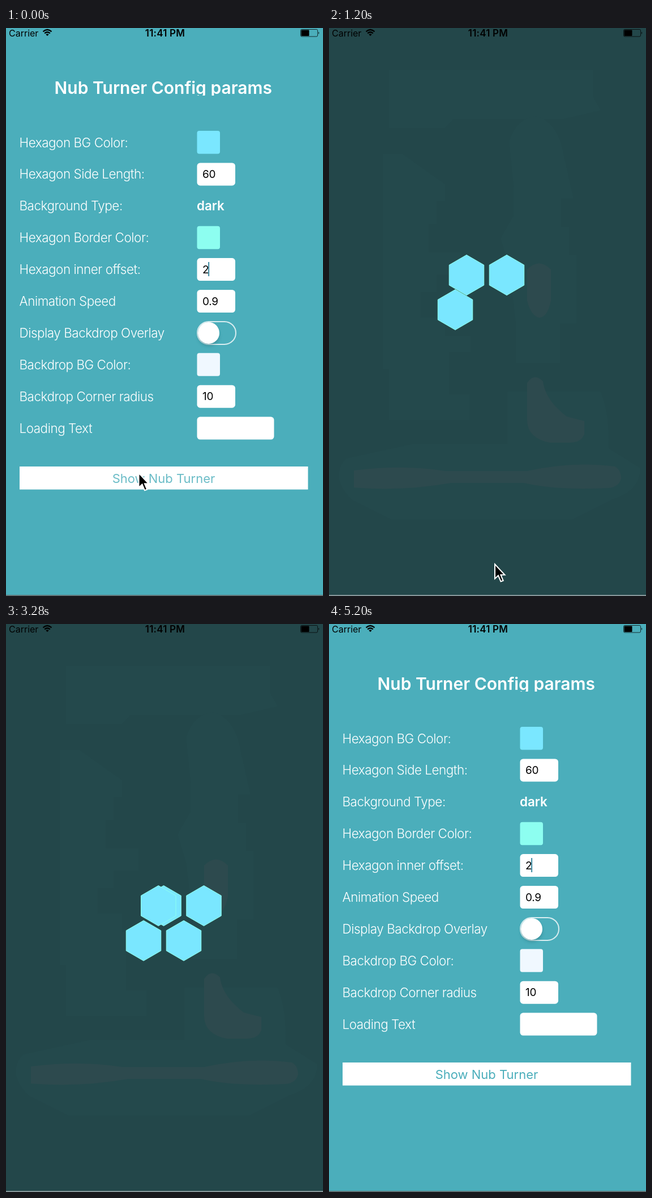
An HTML page that plays this animation: 560 px wide and 1000 px high, repeating every 5.28 s.

```html
<!DOCTYPE html>
<html lang="en">
<head>
<meta charset="utf-8">
<title>Hexagon spinner settings</title>
<style>
  html, body { margin: 0; width: 100%; height: 100%; overflow: hidden; background: #4baebb; }
  svg { display: block; width: 560px; height: 1000px; }
  text { font-family: Inter, Roboto, sans-serif; }
  .title { font-size: 30px; font-weight: 600; fill: #fff; }
  .label { font-size: 22.5px; font-weight: 300; letter-spacing: -.5px; fill: #fff; }
  .value { font-size: 22.4px; font-weight: 600; fill: #fff; }
  .entry { font-size: 19px; letter-spacing: -.3px; fill: #000; }
  .action { font-size: 22px; fill: #4baebb; }
  .status { font-size: 16px; fill: #000; }
  .time { font-size: 17px; font-weight: 600; letter-spacing: .2px; }
  .hex { fill: #7ae7ff; stroke: #8dfef0; stroke-width: 1; }
</style>
</head>
<body>
<svg viewBox="0 0 560 1000">
  <defs>
    <clipPath id="cut"><rect y="80" width="560" height="39"/></clipPath>
    <filter id="soft" x="-30%" y="-30%" width="160%" height="160%"><feGaussianBlur stdDeviation="3"/></filter>
  </defs>

  <rect width="560" height="1000" fill="#4baebb"/>
  <text class="title" x="470" y="115.5" text-anchor="end" clip-path="url(#cut)">Nub Turner Config params</text>
  <g id="form"></g>
  <rect x="24" y="772" width="509.5" height="40.5" fill="#fff"/>
  <text id="action" class="action" x="278.5" y="801" text-anchor="middle">Show Nub Turner</text>
  <rect y="998" width="560" height="2" fill="#5f7377"/>

  <g id="overlay">
    <rect width="560" height="1000" fill="#23474a"/>
    <g fill="#24494c">
      <path d="M106 74H466V120L480 145L415 160H220L205 176H106Z"/>
      <path d="M95 222H130L205 275V305H190V345H176V395H234V434H190V465H162V510H205V542H250V570H212V645H248V690H106V600H95Z"/>
      <path d="M318 200Q330 160 365 155Q405 165 415 225L432 300H410V350H424V400H437V520H408V590H330V520L318 420L303 370L326 330V280Z"/>
      <path d="M315 640H480Q496 680 494 740L550 775Q550 815 500 830L430 865H110L40 830Q0 790 30 758L150 732H315Z"/>
    </g>
    <g fill="#2d4a4e">
      <path d="M350 425Q371 404 392 425V480Q386 510 371 510Q356 506 350 480Z"/>
      <path d="M350 625Q362 606 378 622Q382 655 420 684L451 692V715Q446 730 425 730H390Q350 722 350 690Z"/>
      <path d="M44 779Q130 768 205 780H350Q430 762 505 772Q516 778 516 793Q512 810 490 810Q400 814 345 801H215Q130 816 44 809Z"/>
    </g>
    <rect y="998" width="560" height="2" fill="#87979a"/>
    <g id="cells"></g>
  </g>

  <text class="status" x="5" y="14.5">Carrier</text>
  <g fill="none" stroke="#000" stroke-width="2.2">
    <path d="M65.5 6.3Q73 -.3 80.5 6.3"/>
    <path d="M68.2 9.3Q73 5.2 77.8 9.3"/>
  </g>
  <path d="M70.3 11.3Q73 9.2 75.7 11.3L73 14Z"/>
  <text class="status time" x="281" y="15" text-anchor="middle">11:41 PM</text>
  <rect x="520.5" y="2.5" width="30" height="12.5" rx="2" fill="none" stroke="#000" stroke-opacity=".75"/>
  <rect x="521.5" y="3.5" width="14" height="10.5" rx="1"/>
  <path d="M552 6.5Q554 8.7 552 11Z"/>

  <path id="cursor" d="M0 0V25.5L6 20L10.5 30.5L14.7 29L10.4 18.7H17.5Z" fill="#000" stroke="#fff" stroke-width="2"/>
</svg>

<script>
const LOOP = 5280, FRAME = 80;
const GROW = 155, MOVE = 200, SHRINK = 147;
const OUT = 388, OUT_STEP = 337;
const BACK = 2433, BACK_STEP = 347;
const CENTER = [278.5, 496];
// Offsets in the order the cells leave the center; the last one stays there.
const CELLS = [[-35.5, -61], [35.5, -61], [-71, 0], [71, 0], [-35.5, 61.5], [35.5, 61.5], [0, 0]];
const CYCLE_END = BACK + 6 * BACK_STEP + MOVE + SHRINK;
const CYCLE = CYCLE_END - (OUT - GROW);

const $ = id => document.getElementById(id);
const ramp = (t, start, span) => Math.min(1, Math.max(0, (t - start) / span));
const ease = p => (1 - Math.cos(Math.PI * p)) / 2;

function add(parent, tag, attrs, text) {
  const el = document.createElementNS('http://www.w3.org/2000/svg', tag);
  for (const key in attrs) el.setAttribute(key, attrs[key]);
  if (text) el.textContent = text;
  return parent.appendChild(el);
}

const form = $('form');
const swatch = fill => y => add(form, 'rect', { x: 337.5, y: y - 20.5, width: 40.5, height: 40.5, rx: 4, fill });
const field = (text, width = 67.5) => y => {
  add(form, 'rect', { x: 337.5, y: y - 20, width, height: 40, rx: 5.5, fill: '#fff' });
  add(form, 'text', { class: 'entry', x: 347, y: y + 6.5 }, text);
};
const toggle = y => {
  add(form, 'rect', { x: 338, y: y - 20, width: 68, height: 40, rx: 20, fill: 'none', stroke: '#d8edf0', 'stroke-width': 2 });
  add(form, 'circle', { cx: 358, cy: y + 4, r: 18, fill: '#17555e', opacity: .4, filter: 'url(#soft)' });
  add(form, 'circle', { cx: 358, cy: y, r: 19, fill: '#fff' });
};

[
  ['Hexagon BG Color:', swatch('#7ae7ff')],
  ['Hexagon Side Length:', field('60')],
  ['Background Type:', y => add(form, 'text', { class: 'value', x: 337, y: y + 8 }, 'dark')],
  ['Hexagon Border Color:', swatch('#8dfef0')],
  ['Hexagon inner offset:', field('2')],
  ['Animation Speed', field('0.9')],
  ['Display Backdrop Overlay', toggle],
  ['Backdrop BG Color:', swatch('#f0f8ff')],
  ['Backdrop Corner radius', field('10')],
  ['Loading Text', field('', 136)]
].forEach(([label, control], i) => {
  const y = 201.5 + 55.9 * i;
  add(form, 'text', { class: 'label', x: 23.5, y: y + 8 }, label);
  control(y);
});
add(form, 'rect', { x: 357, y: 412, width: 2.2, height: 25, fill: '#4b93a8' });

// The resting center cell lies below the moving ones.
const cells = CELLS.map(() => add($('cells'), 'path', { class: 'hex', d: 'M0-35.5L30.75-17.75V17.75L0 35.5L-30.75 17.75V-17.75Z' }));
$('cells').prepend(cells[6]);

function poseCell(el, i, t) {
  const [dx, dy] = CELLS[i];
  const out = OUT + i * OUT_STEP, back = BACK + i * BACK_STEP;
  const reach = ease(ramp(t, out, MOVE)) - ease(ramp(t, back, MOVE));
  const size = ramp(t, out - GROW, GROW) - ramp(t, back + MOVE, SHRINK);
  el.style.display = size > 0 ? '' : 'none';
  el.setAttribute('opacity', .4 + .6 * size);
  el.setAttribute('transform', `translate(${CENTER[0] + dx * reach} ${CENTER[1] + dy * reach}) scale(${size})`);
}

function draw(t) {
  $('overlay').setAttribute('opacity', t < 5120 ? ramp(t, 60, 140) : 0);
  $('action').setAttribute('opacity', t < 80 ? .82 : 1);

  const local = t > CYCLE_END ? t - CYCLE : t;
  cells.forEach((el, i) => poseCell(el, i, local));

  const go = ease(ramp(t, 520, 360));
  const leave = ramp(t, 2560, 240);
  $('cursor').setAttribute('transform', `translate(${234.5 + 58.5 * go} ${783.5 + 160.5 * go + 60 * leave * leave})`);
  $('cursor').style.display = leave < 1 ? '' : 'none';
}

const start = performance.now();
function tick() {
  const t = (performance.now() - start) % LOOP;
  draw(Math.floor(t / FRAME) * FRAME);
  requestAnimationFrame(tick);
}
draw(0);
requestAnimationFrame(tick);
</script>
</body>
</html>
```
